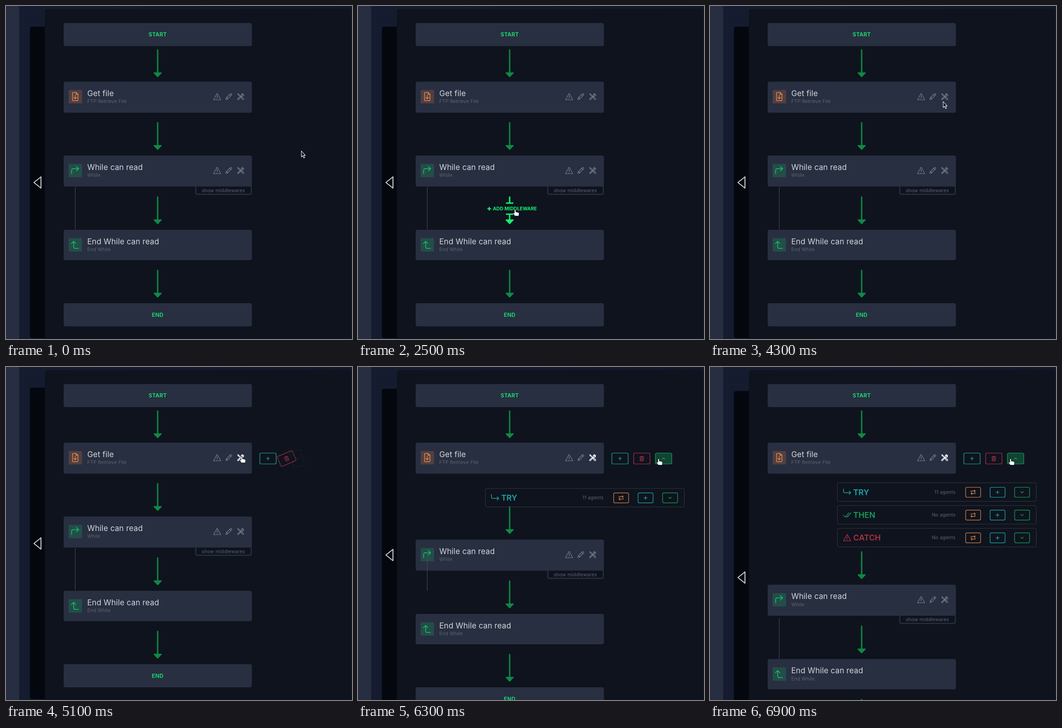
Animation, 762 px wide and 735 px high, one loop 8 s. Source, as an HTML page:

```html
<!DOCTYPE html>
<html lang="en">
<head>
<meta charset="utf-8">
<title>Flow editor</title>
<style>
html, body { margin: 0; width: 100%; height: 100%; overflow: hidden; background: #0f131d; }
svg { display: block; width: 762px; height: 735px; font-family: Inter, "Open Sans", sans-serif; }
.line { fill: none; stroke-linecap: round; stroke-linejoin: round; }
.title { font-size: 17px; letter-spacing: .15px; fill: #d3d6dc; }
.note { font-size: 10.5px; letter-spacing: .2px; fill: #5e6473; }
.edge { font-size: 12px; font-weight: 600; letter-spacing: .2px; fill: #14e873; text-anchor: middle; }
.add { font-size: 10.5px; font-weight: 700; }
.stage { font-size: 17.5px; font-weight: 600; }
.end { text-anchor: end; }
</style>
</head>
<body>
<svg id="view" viewBox="0 0 762 735">
  <defs>
    <linearGradient id="navy" x1="0" y1="0" x2="1" y2="0">
      <stop offset="0" stop-color="#161c30"/><stop offset="1" stop-color="#12182a"/>
    </linearGradient>
  </defs>
  <rect width="762" height="735" fill="url(#navy)"/>
  <rect width="29" height="735" fill="#272e41"/>
  <g id="scene"></g>
</svg>
<script>
const LOOP = 8000, STEP = 100;
const CARD = '#282f41', PANEL = '#0f131d', GREY = '#7d828d';
const TEAL = '#18b3b3', RED = '#b8364a', GREEN = '#16a85f', ORANGE = '#de854b';

const ICON = {
  warn: 'M0-7 L8 7 H-8 Z M0-2 V2.5 M0 4.6 V4.8',
  pencil: 'M-6.5 6.5 L-5.2 2.2 L3.6-6.2 Q4.8-7 5.9-5.9 Q7-4.8 6.2-3.6 L-2.2 5.2 Z M2-4.6 L4.7-1.9 M-5.2 2.2 L-2.2 5.2',
  tools: 'M-6.5-6.5 L-3.5-5 L-2.8-3 L1 .8 M-6.5-6.5 L-5-3.4 L-3-2.7 L.8 1 M1.2 2.8 L3 1 L6.8 4.8 Q7 6.6 5 6.8 Z' +
    ' M-6.6 5.2 L1.2-2.2 Q.8-6.2 5-6.6 L3.4-4 L4.2-3 L6.8-4.8 Q6.8-.4 2.4-1 L-5 6.8 Q-7 7-6.6 5.2',
  file: 'M-6-7.5 Q-6-9-4.5-9 H2 L6-5 V7.5 Q6 9 4.5 9 H-4.5 Q-6 9-6 7.5 Z M2-9 V-5 H6 M0-3 V5 M-3 2 L0 5 L3 2',
  enter: 'M-8 7 V0 Q-8-4-4-4 H7.5 M2.5-9 L7.5-4 L2.5 1',
  leave: 'M7 8 H0 Q-3.5 8-3.5 4.5 V-7.5 M-8.5-2.5 L-3.5-7.5 L1.5-2.5',
  plus: 'M-3.5 0 H3.5 M0-3.5 V3.5',
  trash: 'M-4.5-3.5 H4.5 M-1.5-3.5 V-5 H1.5 V-3.5 M-3.5-3.5 V4 Q-3.5 5.2-2.3 5.2 H2.3 Q3.5 5.2 3.5 4 V-3.5 M-1.2-1 V2.8 M1.2-1 V2.8',
  down: 'M-3-1.5 L0 1.5 L3-1.5',
  up: 'M-3 1.5 L0-1.5 L3 1.5',
  swap: 'M-4.5-.5 V-2.8 H4.5 M2.5-5 L4.7-2.8 L2.5-.8 M4.5 .5 V2.8 H-4.5 M-2.5 .8 L-4.7 2.8 L-2.5 5',
  turn: 'M-8-7 V-1.5 Q-8 1.5-5 1.5 H8 M4.5-2 L8 1.5 L4.5 5',
  checks: 'M-8 1 L-4 5 L4-4.5 M-1.5 3 L.5 5 L8.5-4.5'
};

const ROWS = [
  ['TRY', '11 agents', 'turn', '#16a9a8'],
  ['THEN', 'No agents', 'checks', '#139f58'],
  ['CATCH', 'No agents', 'warn', '#ac3143']
];

const BUTTONS = [
  { x: 577, start: 4790, icon: 'plus', color: TEAL },
  { x: 625, start: 4990, icon: 'trash', color: RED },
  { x: 673, start: 5088, icon: 'down', color: GREEN }
];

const EASE = {
  both: p => p * p * (3 - 2 * p),
  in: p => p ** 1.4,
  out: p => 1 - (1 - p) ** 1.8
};

// time, x, y, easing used to arrive there
const PATH = [
  [0, 650, 320], [400, 648, 317, 'both'], [500, 648, 317, 'both'],
  [1400, 347, 272, 'both'], [1800, 347, 272, 'both'],
  [2500, 346, 450, 'both'], [2800, 346, 450, 'both'],
  [2900, 342, 449, 'both'], [3200, 342, 449, 'both'],
  [3300, 345, 431, 'both'], [3400, 345, 431, 'both'],
  [3700, 394, 335, 'in'], [4300, 513, 211, 'out'], [4400, 513, 211, 'both'],
  [4600, 519, 198, 'both'], [5400, 519, 198, 'both'],
  [6100, 662, 203, 'both'], [LOOP, 662, 203, 'both']
];

const ramp = (t, from, to) => Math.min(1, Math.max(0, (t - from) / (to - from)));
const mix = (a, b, k) => a + (b - a) * k;
const rgb = (a, b, k) => `rgb(${a.map((v, i) => Math.round(mix(v, b[i], k)))})`;
const move = (x, y, body, extra = '') => `<g transform="translate(${x} ${y})${extra}">${body}</g>`;
const box = (x, y, w, h, r, attrs) => `<rect x="${x}" y="${y}" width="${w}" height="${h}" rx="${r}" ${attrs}/>`;
const text = (x, y, cls, str, attrs = '') => `<text x="${x}" y="${y}" class="${cls}" ${attrs}>${str}</text>`;
const stroke = (d, color, w = 1.2) => `<path class="line" d="${d}" stroke="${color}" stroke-width="${w}"/>`;
const icon = (name, x, y, color, w) => move(x, y, stroke(ICON[name], color, w));

function pointer(t) {
  const i = Math.max(1, PATH.findIndex(key => key[0] >= t));
  const [t0, x0, y0] = PATH[i - 1], [t1, x1, y1, ease] = PATH[i];
  const k = EASE[ease](ramp(t, t0, t1));
  return { x: mix(x0, x1, k), y: mix(y0, y1, k) };
}

function drawPointer({ x, y }, hand) {
  return hand
    ? move(x, y, '<path d="M-1.6 1 Q-1.4-.5 0-.5 Q1.4-.5 1.6 1 V5 Q2.8 4.2 4 5.2 Q5.3 4.5 6.3 5.7 Q8.4 5.3 8.6 7.2 V10 Q8.6 12 7.4 13.6 H-.6 Q-1.6 11.4-4 8.6 Q-4.8 7.2-3.5 6.6 Q-2.6 6.4-1.6 7.7 Z" fill="#fff" stroke="#10141e" stroke-width=".9"/>')
    : move(x, y, '<path d="M.5 0 V13 L3.5 10.4 L5.7 15.4 L7.8 14.5 L5.6 9.6 H9.4 Z" fill="#11151f" stroke="#eceef2" stroke-width="1.1" stroke-linejoin="round"/>');
}

// k opens the arrow to reveal the label
function arrow(y, k = 0) {
  const color = rgb([13, 138, 68], [14, 245, 112], k);
  const head = `<path d="M-8 52 H8 L0 60.5 Z" fill="${color}" stroke="${color}" stroke-width="2" stroke-linejoin="round"/>`;
  if (!k) return move(334, y, stroke('M0 1.5 V54', color, 3) + head);
  const half = mix(5, 7, k), low = mix(26, 39.5, k), turn = 90 * (1 - k) * .8;
  const bar = top => move(0, top, stroke(`M${-half} 0 H${half}`, color, 2.8), ` rotate(${turn})`);
  const label = stroke('M-48 27.5 h6 m-3 -3 v6', color, 2.4) + text(-37, 31.2, 'add', 'ADD MIDDLEWARE', `fill="${color}"`);
  return move(334, y, stroke('M0 1.5 V14.5', color, 3) + bar(15) + bar(low) +
    stroke(`M0 ${low} V54`, color, 3) + head + `<g opacity="${k * k}">${label}</g>`);
}

const card = (y, h) => box(127, y, 414.5, h, 4, `fill="${CARD}"`);
const terminal = (y, label) => card(y, 51) + text(334, y + 29.5, 'edge', label);

function node(y, h, title, note, glyph, color, toolColor) {
  let out = card(y, h) + box(138, y + 18.5, 29.5, 29.5, 1, `fill="${color}" opacity=".2"`) +
    icon(glyph, 152.5, y + 33, color, 1.5) +
    text(179, y + 31.5, 'title', title) + text(179, y + 47, 'note', note);
  if (toolColor) {
    out += icon('warn', 465, y + 33, GREY) + icon('pencil', 490.7, y + 33, GREY) +
      icon('tools', 516.7, y + 33, toolColor, toolColor === GREY ? 1.2 : 1.5);
  }
  return out;
}

function button(w, h, glyph, color, filled) {
  return box(-w / 2, -h / 2, w, h, 3, `fill="${color}" fill-opacity="${filled ? .32 : 0}" stroke="${color}" stroke-width="1.2"`) +
    stroke(ICON[glyph], color, 1.2);
}

function actions(t, at) {
  return BUTTONS.map(b => {
    const k = 1 - (1 - ramp(t, b.start, b.start + 215)) ** 2.3;
    if (!k) return '';
    const glyph = b.icon === 'down' && t >= 6300 ? 'up' : b.icon;
    const body = button(36, 24, glyph, b.color, overButton(b, at));
    return `<g opacity="${k}">` + move(b.x - 36 * (1 - k), 202, body, ` rotate(${-120 * (1 - k)})`) + '</g>';
  }).join('');
}

function stageRow(y, [name, note, glyph, color]) {
  return box(280.5, y, 438, 41, 3, 'fill="none" stroke="#323741"') +
    icon(glyph, 302, y + 20.5, color, 1.4) +
    text(315.5, y + 27, 'stage', name, `fill="${color}"`) +
    text(541, y + 24, 'note end', note) +
    move(579.5, y + 21, button(33, 22, 'swap', ORANGE)) +
    move(633.3, y + 21, button(33, 22, 'plus', TEAL)) +
    move(687.3, y + 21, button(33, 22, 'down', GREEN));
}

const overButton = (b, p) => Math.abs(p.x - b.x) < 18.5 && Math.abs(p.y - 202) < 12;
const overArrow = (y, p) => Math.abs(p.x - 334) < 62 && p.y > y && p.y < y + 62;

// rows shown, push of the lower nodes, ends of the loop line
function layout(t) {
  if (t < 6300) return [0, 0, 400, 493];
  if (t < 6400) return [1, 51, 400, 493];
  if (t < 6500) return [2, 102.5, 465, 587];
  if (t < 6900) return [3, 146, 545, 638];
  return [3, 150.5, 555, 644];
}

function draw(t) {
  const at = pointer(t);
  const [count, push, lineTop, lineEnd] = layout(t);
  const open2 = ramp(t, 1130, 1400) * (1 - ramp(t, 2030, 2300));
  const open3 = ramp(t, 2300, 2500) * (1 - ramp(t, 3500, 3770));
  const hand = t >= 4500 && at.x < 530 || overArrow(256, at) || overArrow(420, at) ||
    BUTTONS.some(b => overButton(b, at));
  const rowTop = 255.5 + (150.5 - push) / 8, rowStep = 47.8 + push / 60;

  const lower = arrow(256, open2) +
    box(418, 390, 122, 25.5, 3, `fill="${PANEL}" stroke="${CARD}" stroke-width="2.4"`) +
    text(431, 410.5, 'note', 'show middlewares') +
    node(330, 68.5, 'While can read', 'While', 'enter', '#12c96b', GREY) +
    arrow(420, open3) +
    node(494, 67, 'End While can read', 'End While', 'leave', '#12c96b') +
    arrow(582) + terminal(656, 'END');

  document.getElementById('scene').innerHTML =
    box(52.5, 45.5 + push * .05, 60, 687.5 + push, 5, 'fill="#04070e"') +
    box(85.5, 7, 675, 760, 5, `fill="${PANEL}"`) +
    move(0, push / 2, stroke('M61.5 389.5 L77 377 V402 Z', '#c3c7ce', 2.2)) +
    terminal(37.5, 'START') + arrow(95.5) +
    node(167, 68.5, 'Get file', 'FTP Retrieve File', 'file', '#ee8848', t >= 4600 ? '#fff' : GREY) +
    move(0, push, lower) +
    `<path d="M152.5 ${lineTop} V${lineEnd}" stroke="#4a4f5b"/>` +
    ROWS.slice(0, count).map((row, i) => stageRow(rowTop + i * rowStep, row)).join('') +
    actions(t, at) + drawPointer(at, hand);
}

let shown = -1;
const origin = performance.now();
function tick() {
  const t = Math.floor(((performance.now() - origin) % LOOP) / STEP) * STEP;
  if (t !== shown) draw(shown = t);
  requestAnimationFrame(tick);
}
tick();
</script>
</body>
</html>
```
